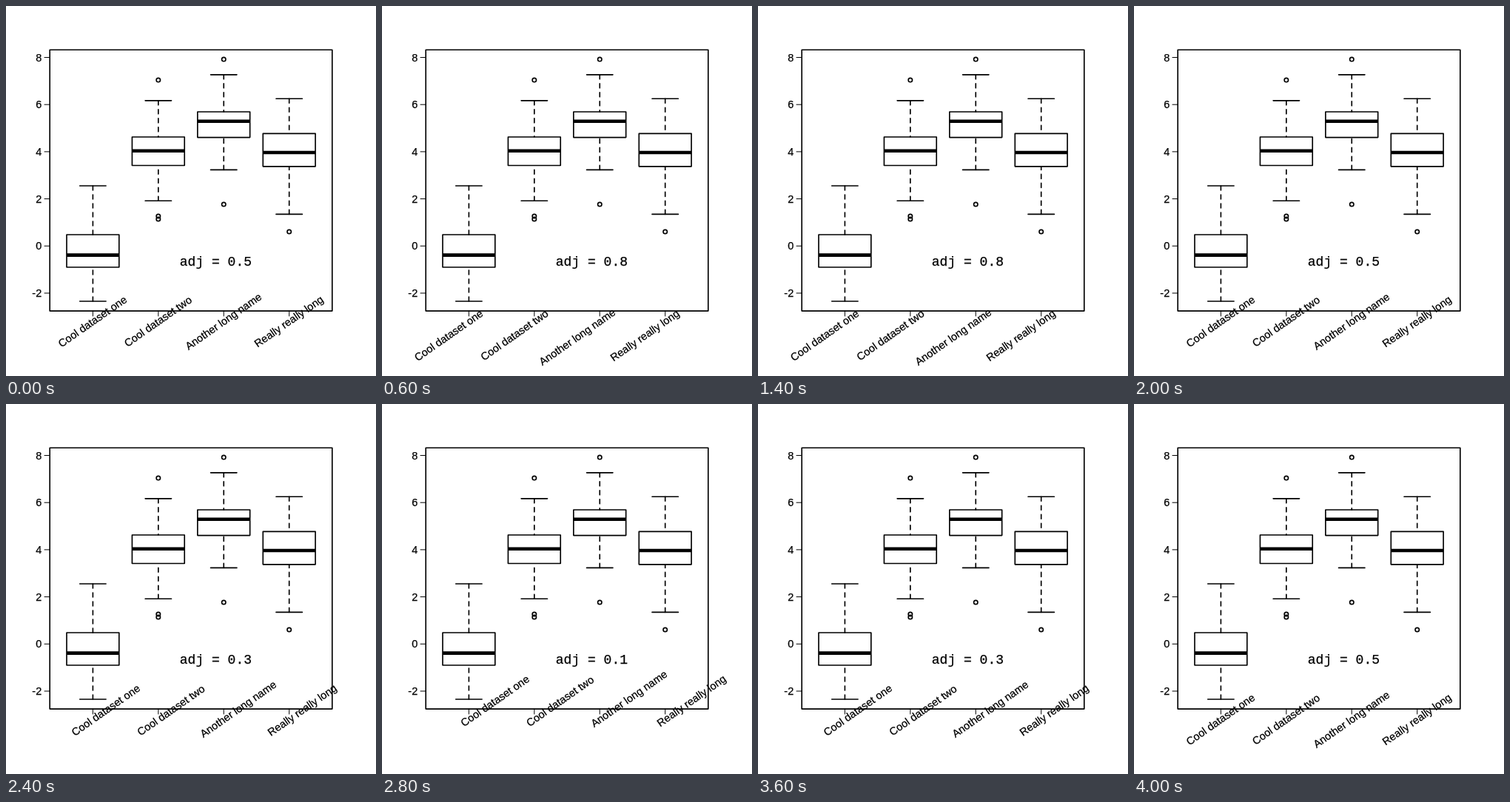
An HTML page for the animation above (4.2 s loop, 500 px wide and 500 px high).

```html
<!DOCTYPE html>
<html lang="en">
<head>
<meta charset="utf-8">
<title>Label adjustment</title>
<style>
  html, body { margin: 0; width: 100%; height: 100%; overflow: hidden; background: #fff; }
  svg { display: block; width: 100vw; height: 100vh; }
  text { font: 14.45px "Liberation Sans", Arial, sans-serif; fill: #000; stroke: #000; stroke-width: .25; }
  .value { font: 18px "Liberation Mono", Courier, monospace; white-space: pre; }
  .num { text-anchor: end; }
  .line { fill: none; stroke: #000; stroke-width: 1.65; stroke-linecap: round; stroke-linejoin: round; }
  .tick { stroke-width: 1; }
  .dash { stroke-dasharray: 6 6; }
  .median { stroke-width: 4.6; stroke-linecap: butt; }
</style>
</head>
<body>
<svg id="plot" viewBox="0 0 500 500"></svg>
<script>
const plot = document.getElementById('plot');
const STEP = 200, STEPS = 21, ANGLE = 35;
const FIRST = 117.4, GAP = 88.43, HALF = 35.4;

// low whisker, lower quartile, median, upper quartile, high whisker (pixels)
const groups = [
  { name: 'Cool dataset one', box: [399, 353, 336.6, 309, 243], out: [] },
  { name: 'Cool dataset two', box: [263.2, 215.5, 195.8, 177, 127.8], out: [100, 284, 288] },
  { name: 'Another long name', box: [221.4, 177.6, 155.8, 143, 92.8], out: [72, 268] },
  { name: 'Really really long', box: [281.4, 216.8, 198, 172.3, 125.2], out: [305] }
];

function add(tag, attrs, text = '') {
  const el = document.createElementNS('http://www.w3.org/2000/svg', tag);
  for (const key in attrs) el.setAttribute(key, attrs[key]);
  el.textContent = text;
  return plot.appendChild(el);
}
const line = (x1, y1, x2, y2, kind = '') =>
  add('line', { x1, y1, x2, y2, class: 'line ' + kind });
const rect = (x, y, width, height) =>
  add('rect', { x, y, width, height, class: 'line' });

rect(59.2, 59.2, 381.6, 352.9);

for (let v = -2; v <= 8; v += 2) {
  const y = 324.3 - v * 31.85;
  line(52, y, 59, y, 'tick');
  add('text', { x: 48.2, y: y + 5.1, class: 'num' }, v);
}

groups.forEach((g, i) => {
  const x = FIRST + i * GAP;
  const [low, q1, mid, q3, high] = g.box;
  line(x, low, x, q1, 'dash');
  line(x, high, x, q3, 'dash');
  for (const y of [low, high]) line(x - HALF / 2, y, x + HALF / 2, y);
  rect(x - HALF, q3, HALF * 2, q1 - q3);
  line(x - HALF, mid, x + HALF, mid, 'median');
  for (const cy of g.out) add('circle', { cx: x, cy, r: 2.7, class: 'line' });
  line(x, 412, x, 419, 'tick');
  g.label = add('text', {
    transform: `translate(${x - 0.4} 426.4) rotate(${-ANGLE})`, y: 4.8
  }, g.name);
  g.width = g.label.getComputedTextLength();
});

const value = add('text', { x: 234.8, y: 351, class: 'value' });

let last = -1;
function draw(now) {
  const k = Math.floor(now / STEP) % STEPS;
  if (k === last) return;
  last = k;
  const adj = (k <= 15 ? 10 - Math.abs(k - 5) : k - 15) / 10;
  value.textContent = 'adj = ' + adj;
  for (const g of groups) g.label.setAttribute('x', -adj * g.width);
}

const start = performance.now();
function frame() {
  draw(performance.now() - start);
  requestAnimationFrame(frame);
}
frame();
</script>
</body>
</html>
```
